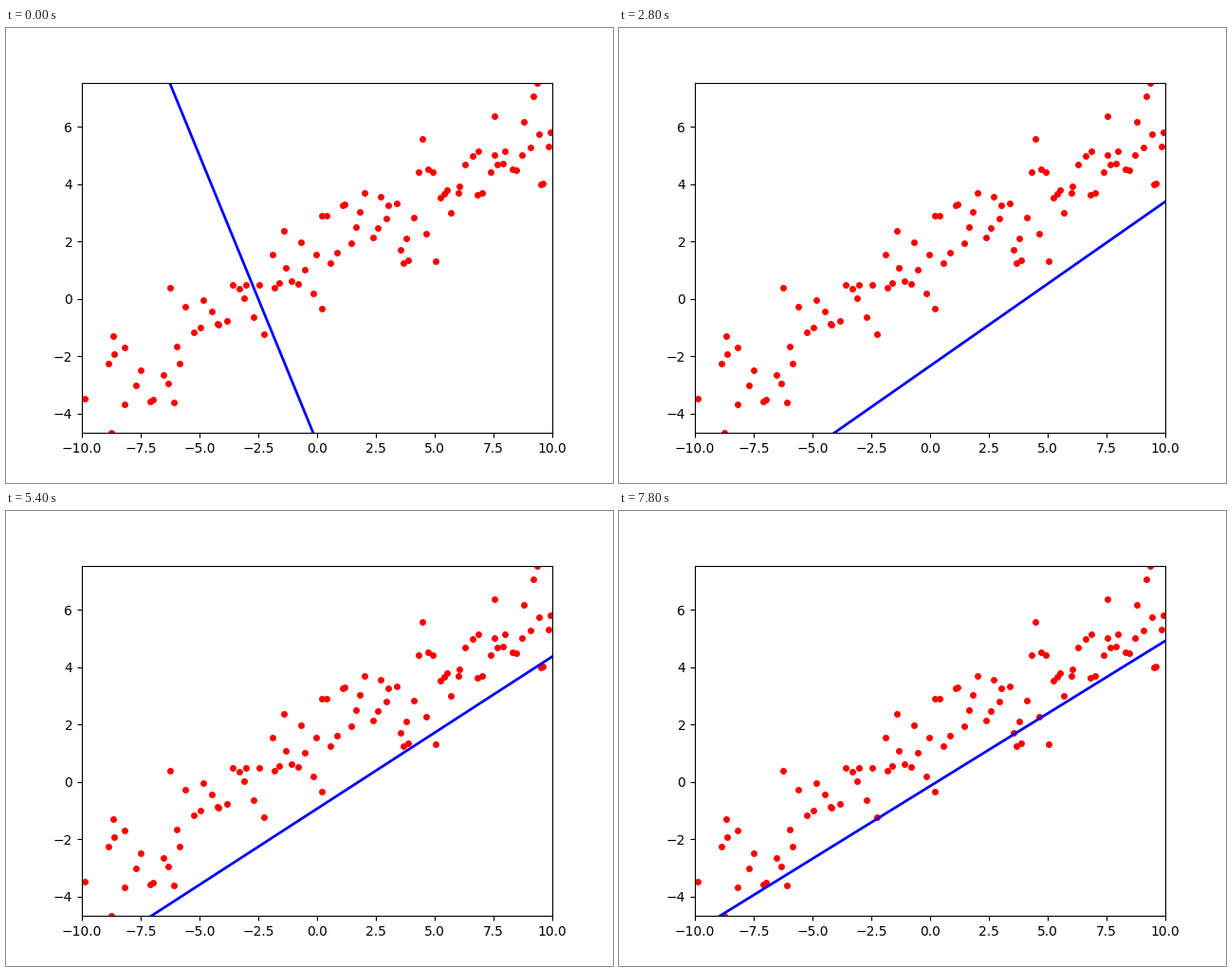
These frames come from a looping animation (640x480 px, 8000 ms). A matplotlib script:

```python
import numpy as np
import matplotlib.pyplot as plt
from matplotlib.animation import FuncAnimation

W, H, DPI = 640, 480, 100
FRAMES, INTERVAL = 40, 200
XLIM, YLIM = (-10, 10), (-4.67, 7.54)

RATE = 0.04
START = np.array([-2.0, -5.0])    # slope, intercept
BEST = np.array([0.467, 1.15])
MEAN_X, MEAN_X2 = 0.945, 32.1

# Outermost samples; the rest scatter around the best line
OUTER = [(-9.87, -3.48), (-8.75, -4.67), (-8.62, -1.92), (-6.25, 0.4),
         (-6.08, -3.6), (-1.4, 2.38), (0.2, 2.9), (3.68, 1.26), (4.48, 5.57),
         (5.05, 1.32), (7.55, 6.37), (9.35, 7.54), (9.52, 4.0), (9.9, 5.8)]
COUNT = 100 - len(OUTER)


def samples(seed=4):
    rng = np.random.default_rng(seed)
    t = (np.arange(COUNT) + rng.uniform(0, 1, COUNT)) / COUNT
    x = 19.2 * t ** 0.85 - 9.3
    noise = np.clip(rng.normal(0, 0.95, COUNT), -1.6, 1.6)
    y = BEST[0] * x + BEST[1] + noise
    return np.vstack([OUTER, np.column_stack([x, y])]).T


fig, ax = plt.subplots(figsize=(W / DPI, H / DPI), dpi=DPI)
ax.set_xlim(*XLIM)
ax.set_ylim(*YLIM)
ax.plot(*samples(), "ro", markersize=4)
line, = ax.plot([], [], "b-", linewidth=2)

# Gradient descent on the squared error of a straight line
hessian = np.array([[MEAN_X2, MEAN_X], [MEAN_X, 1.0]])
step = np.eye(2) - RATE * hessian
ends = np.array(XLIM)


def update(i):
    slope, offset = BEST + np.linalg.matrix_power(step, i) @ (START - BEST)
    line.set_data(ends, slope * ends + offset)
    return line,


anim = FuncAnimation(fig, update, frames=FRAMES, interval=INTERVAL,
                     init_func=lambda: update(0), repeat=True, repeat_delay=0)
plt.show()
```
